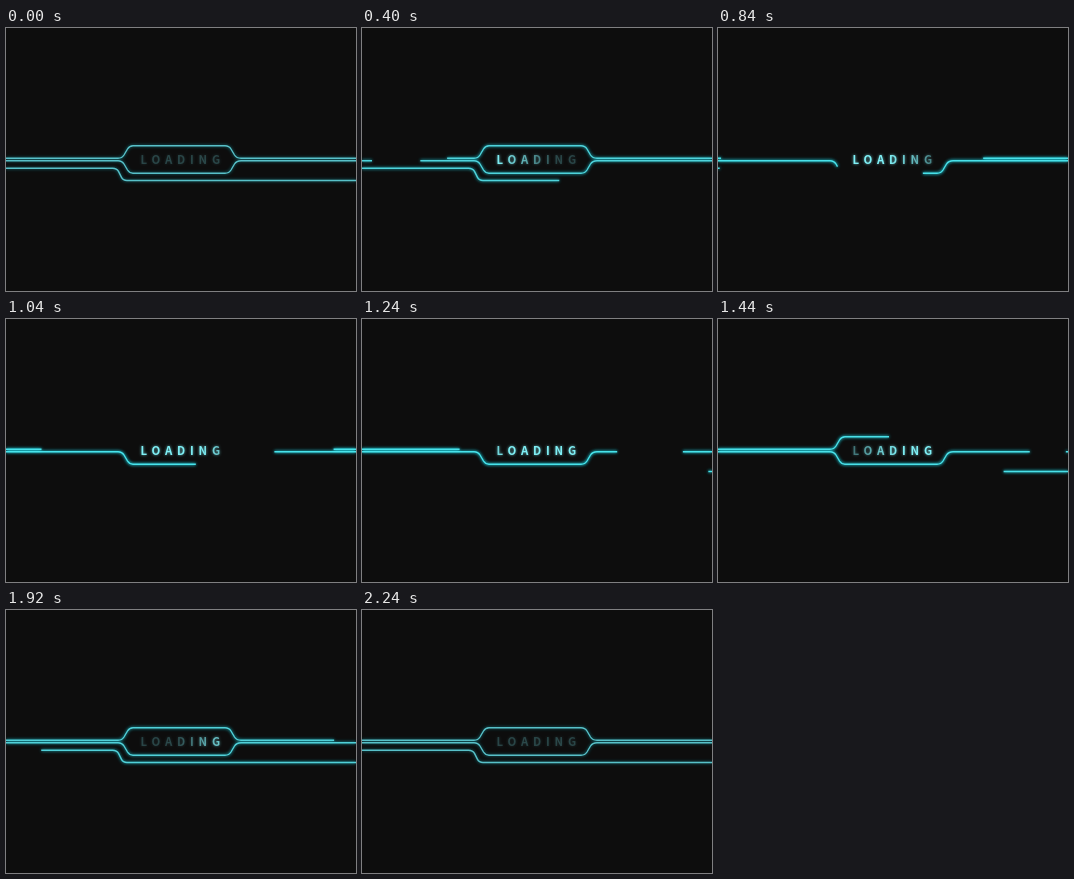
An HTML page for the animation above (2400 ms loop, 350 by 263 pixels).

```html
<!DOCTYPE html>
<html lang="en">
<head>
<meta charset="utf-8">
<title>Loading</title>
<style>
  html, body { margin: 0; width: 100%; height: 100%; overflow: hidden; background: #0d0d0d; }
  svg { display: block; width: 100%; height: 100%; }
  path { fill: none; }
  #core { stroke-width: 1.4; }
  #glow { stroke: #16c4d2; stroke-width: 2.4; }
  text { font: 700 11.4px "Noto Sans CJK JP", "Noto Sans", sans-serif; letter-spacing: 4.8px; fill: url(#sweep); }
</style>
</head>
<body>
<svg viewBox="0 0 350 263">
  <defs>
    <filter id="blur" filterUnits="userSpaceOnUse" x="-10" y="100" width="370" height="70">
      <feGaussianBlur stdDeviation="1.7"/>
    </filter>
    <linearGradient id="sweep" gradientUnits="userSpaceOnUse" x1="0" y1="0" x2="350" y2="0">
      <stop stop-color="#7ff0f6" stop-opacity=".2"/>
      <stop stop-color="#7ff0f6"/>
      <stop stop-color="#7ff0f6"/>
      <stop stop-color="#7ff0f6" stop-opacity=".2"/>
    </linearGradient>
  </defs>
  <g id="glow" filter="url(#blur)"></g>
  <g id="core"></g>
  <text x="134.6" y="136.3" filter="url(#blur)" opacity=".75" aria-hidden="true">LOADING</text>
  <text x="134.6" y="136.3">LOADING</text>
</svg>
<script>
const LOOP = 2400, END = 2240, STEP = 40;
const SOFT = 30; // half width of the text's fading edge

// Each line is erased, then redrawn, along its path: [start, duration] in ms.
const lines = [
  { d: "M0 130.2H112Q116 130.2 118 127L121.5 121Q123.5 117.8 127 117.8H219Q223 117.8 225 121L228.5 127Q230.5 130.2 235 130.2H350",
    erase: [0, 1240], draw: [760, 1380] },
  { d: "M0 132.7H112Q116 132.7 118 136L121.5 142Q123.5 145.2 127 145.2H219Q223 145.2 225 142L228.5 136Q230.5 132.7 235 132.7H350",
    erase: [0, 1520], draw: [238, 1525] },
  { d: "M350 152.5H121Q117 152.5 115.5 149.4L112.5 143.4Q110.8 140.2 106.5 140.2H0",
    erase: [0, 880], draw: [1180, 930] }
];

// Centre of the text's lighting and dimming edges: [time, x]
const lightEdge = [[0, 105], [400, 163], [840, 201], [1240, 246]];
const dimEdge = [[1160, 105], [1440, 152], [1720, 173], [2240, 246]];

const core = document.getElementById("core");
const glow = document.getElementById("glow");
const stops = document.querySelectorAll("stop");

for (const line of lines) {
  line.paths = [core, glow].map(group => {
    const path = document.createElementNS("http://www.w3.org/2000/svg", "path");
    path.setAttribute("d", line.d);
    return group.appendChild(path);
  });
  line.length = line.paths[0].getTotalLength();
}

const clamp = v => Math.min(1, Math.max(0, v));
const ease = (t, [start, span]) => (1 - Math.cos(Math.PI * clamp((t - start) / span))) / 2;
const mix = (a, b, k) => a + (b - a) * k;

function track(points, t) {
  let x = points[0][1];
  for (let i = 1; i < points.length; i++) {
    const [t0, x0] = points[i - 1], [t1, x1] = points[i];
    if (t > t0) x = mix(x0, x1, clamp((t - t0) / (t1 - t0)));
  }
  return x;
}

function render(t) {
  for (const { paths, length, erase, draw } of lines) {
    const head = length * ease(t, draw);
    const tail = length * ease(t, erase);
    const dash = `${head} ${tail - head} ${length + 1} 0`;
    for (const path of paths) path.setAttribute("stroke-dasharray", dash);
  }

  const power = Math.sin(Math.PI * t / END);
  core.setAttribute("stroke", `rgb(${mix(88, 72, power)},${mix(192, 228, power)},${mix(200, 236, power)})`);
  glow.setAttribute("opacity", mix(0.35, 0.9, power));

  const dim = track(dimEdge, t), light = track(lightEdge, t);
  [dim - SOFT, dim + SOFT, light - SOFT, light + SOFT].forEach((x, i) => {
    stops[i].setAttribute("offset", x / 350);
  });
  // Before the sweep begins both edges coincide, so keep the text dark.
  const lit = t > 0 && t < END ? 1 : 0.2;
  stops[1].setAttribute("stop-opacity", lit);
  stops[2].setAttribute("stop-opacity", lit);
}

const origin = performance.now();
function tick() {
  const t = (performance.now() - origin) % LOOP;
  render(Math.min(END, Math.floor(t / STEP) * STEP));
  requestAnimationFrame(tick);
}
tick();
</script>
</body>
</html>
```
